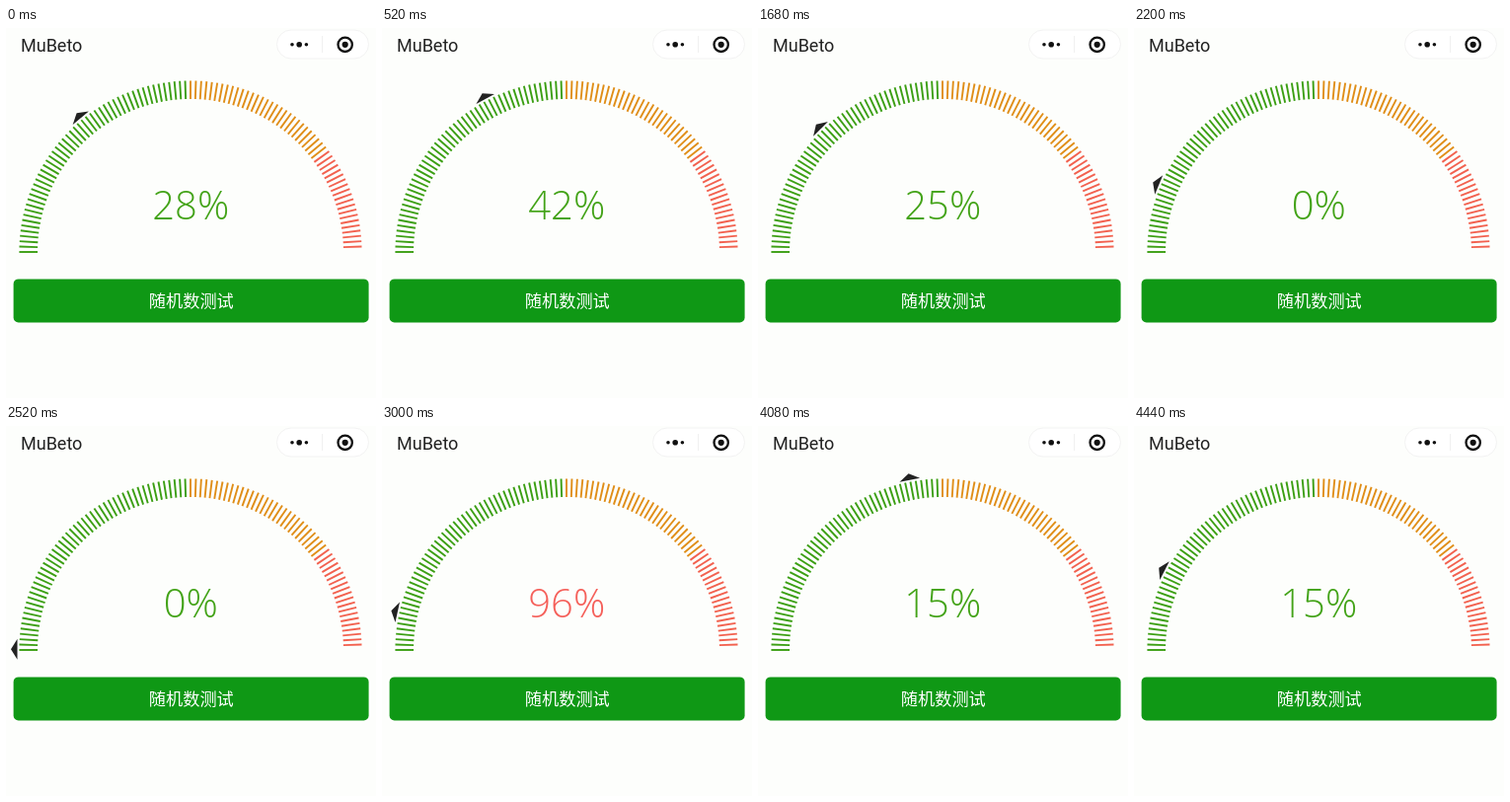
Animation, 375 px wide and 375 px high, one loop 4.52 s. Source, as an HTML page:

```html
<!DOCTYPE html>
<html lang="zh">
<head>
<meta charset="utf-8">
<title>Gauge</title>
<style>
  html, body { margin: 0; width: 100%; height: 100%; overflow: hidden; background: #fdfefc; }
  svg { display: block; width: 100%; height: 100%; }
  .title { font: 18px Roboto, Arial, sans-serif; fill: #222; }
  #value { font: 350 40px "Open Sans", sans-serif; text-anchor: middle; }
  #label { font: 17.2px "Noto Sans CJK SC", "Noto Sans CJK", sans-serif; text-anchor: middle; fill: #fff; }
</style>
</head>
<body>
<svg viewBox="0 0 375 375">
  <text class="title" x="15" y="23.6">MuBeto</text>

  <rect x="274.5" y="2" width="93" height="29" rx="14.5" fill="#fff" stroke="#f3f3f3"/>
  <path d="M320.5 8V25" stroke="#f0f0f0"/>
  <g fill="#111">
    <circle cx="290" cy="16.8" r="1.8"/>
    <circle cx="297.2" cy="16.8" r="2.8"/>
    <circle cx="304.4" cy="16.8" r="1.8"/>
    <circle cx="343.7" cy="16.8" r="3.1"/>
  </g>
  <circle cx="343.7" cy="16.8" r="7.2" fill="none" stroke="#111" stroke-width="2.3"/>

  <g id="ticks" stroke-width="1.9"></g>
  <path id="pointer" d="M11.5 215.7L5 226.2L11.5 236.7Z" fill="#222"/>
  <text id="value" x="187.2" y="194"></text>

  <rect id="button" x="7.6" y="254.4" width="360" height="44" rx="5"/>
  <text id="label" x="187.8" y="283"> 随机数测试</text>
</svg>
<script>
const LOOP = 4520, SWEEP = 430, CX = 187, CY = 227;
const START = 28;
// Each tap: press time, time the pointer sets off, new value
const taps = [
  [240, 405, 42],
  [1040, 1225, 25],
  [1920, 2075, 0],
  [2800, 2965, 96],
  [3760, 3920, 15]
];
const $ = id => document.getElementById(id);
const zone = (v, colors) => colors[v < 50 ? 0 : v < 80 ? 1 : 2];
const turn = v => `rotate(${v * 1.8} ${CX} ${CY})`;

for (let i = 0; i < 100; i++) {
  const line = document.createElementNS("http://www.w3.org/2000/svg", "path");
  line.setAttribute("d", `M13.4 ${CY}H32`);
  line.setAttribute("transform", turn(i));
  line.setAttribute("stroke", zone(i, ["#3c9f14", "#e08e18", "#f2614f"]));
  $("ticks").append(line);
}

// cubic-bezier(.25, .1, .25, 1)
function ease(x) {
  if (x <= 0) return 0;
  if (x >= 1) return 1;
  const curve = (s, a, b) => 3 * s * (1 - s) * ((1 - s) * a + s * b) + s ** 3;
  let lo = 0, hi = 1;
  for (let i = 0; i < 24; i++) {
    const mid = (lo + hi) / 2;
    if (curve(mid, .25, .25) < x) lo = mid; else hi = mid;
  }
  return curve(lo, .1, 1);
}

function draw(now) {
  const t = now % LOOP;
  let value = START, angle = START, pressed = false;
  for (const [press, go, next] of taps) {
    angle += (next - angle) * ease((t - go) / SWEEP);
    if (t >= press + 40) value = next;
    if (t >= press && t < press + 80) pressed = true;
  }
  $("pointer").setAttribute("transform", turn(angle));
  $("value").textContent = value + "%";
  $("value").setAttribute("fill", zone(value, ["#43a318", "#e08e18", "#f5605a"]));
  $("button").setAttribute("fill", pressed ? "#09860c" : "#0f9815");
  $("label").setAttribute("fill-opacity", pressed ? .6 : 1);
  requestAnimationFrame(draw);
}
draw(performance.now());
</script>
</body>
</html>
```
